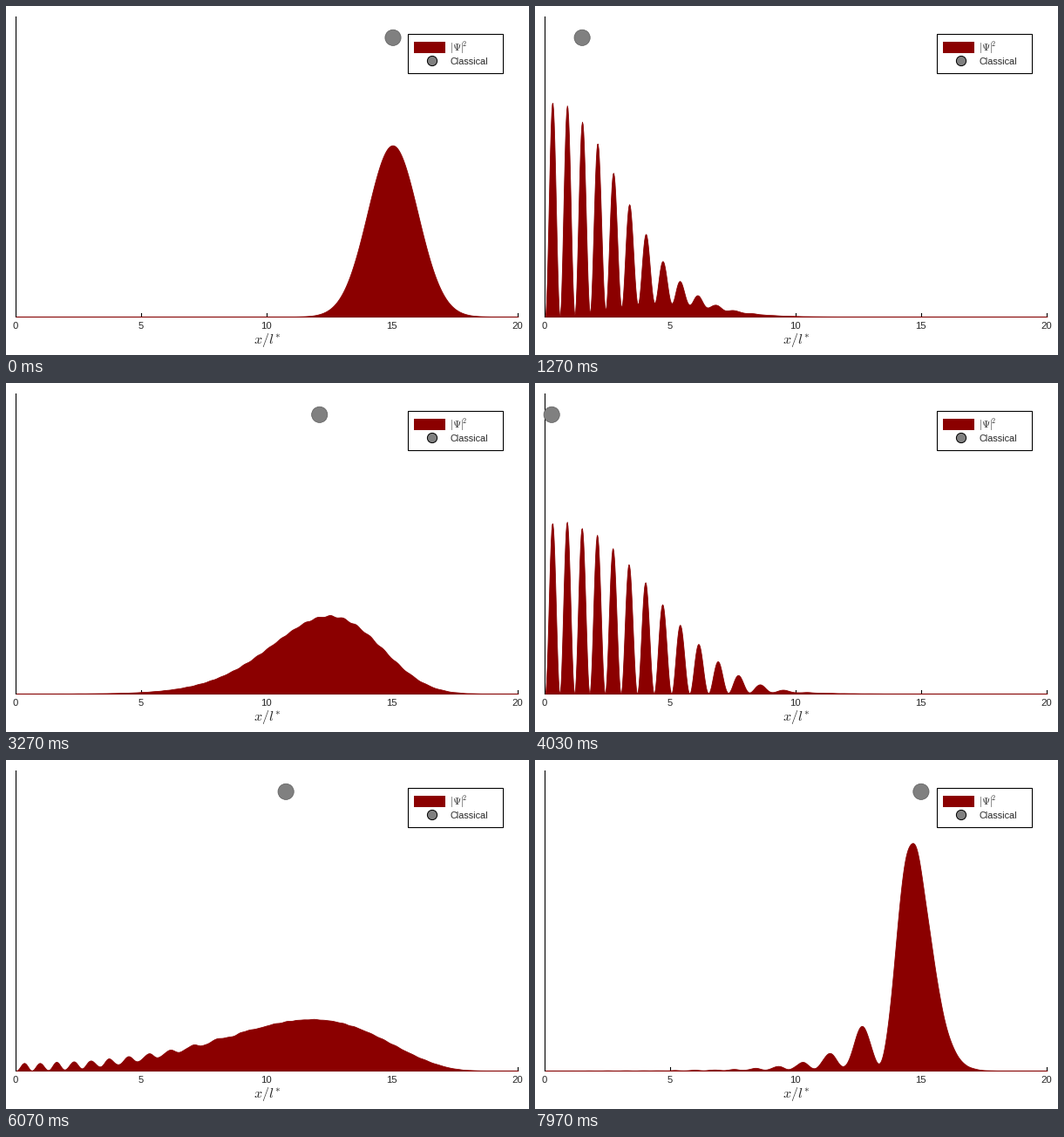
A matplotlib script that plays this animation: 600x400 px, repeating every 8 s.

```python
import numpy as np
import matplotlib.pyplot as plt
from matplotlib.animation import FuncAnimation
from matplotlib.patches import Circle, Polygon, Rectangle

W, H, DPI = 600, 400, 100
FRAMES, LOOP = 240, 8000
PX = 72 / DPI                      # one pixel in points
RED, GRAY, INK = "#8b0000", "#808080", "#262626"

# Plot area in pixels
X0, DX = 12.0, 28.8
Y0, DY = 356.5, 344.5 / 0.7

# Quantum bouncer with hbar = m = g = 1
START = 15.0
PERIOD = 2 * np.sqrt(2 * START)
STEP = PERIOD / 80
HOLD = PERIOD / 240                # short rest of the ball at the floor

N, BOX = 200, 30.0
n = np.arange(1, N + 1)
grid = BOX * n / (N + 1)
k = np.pi * n / BOX
sines = np.sqrt(2 / (N + 1)) * np.sin(np.pi * np.outer(n, n) / (N + 1))
xs = np.linspace(0, 20, 801)
to_xs = np.sqrt(2 / (N + 1)) * np.sin(np.outer(xs, k)) @ sines


def evolve():
    """Density at every frame, by split-step propagation in a sine basis."""
    half_kick = np.exp(-0.5j * STEP * grid)
    drift = np.exp(-0.5j * STEP * k**2)
    psi = np.exp(-(grid - START) ** 2 / 4) / (2 * np.pi) ** 0.25
    out = []
    for _ in range(FRAMES):
        out.append(np.abs(to_xs @ psi) ** 2)
        psi = half_kick * (sines @ (drift * (sines @ (half_kick * psi))))
    return out


def ball_height(frame):
    phase = (frame * STEP + PERIOD / 2) % (PERIOD + HOLD)
    swing = min(phase, PERIOD) - PERIOD / 2
    return START - swing**2 / 2


density = evolve()

plt.rcParams["mathtext.fontset"] = "cm"
fig = plt.figure(figsize=(W / DPI, H / DPI), dpi=DPI, facecolor="white")
ax = fig.add_axes([0, 0, 1, 1])
ax.set_xlim(0, W)
ax.set_ylim(H, 0)
ax.axis("off")


def line(x, y):
    ax.plot(x, y, color="black", lw=1.1 * PX, zorder=1, snap=False,
            solid_capstyle="butt")


def label(x, y, text, size, **kw):
    ax.text(x, y, text, fontsize=size * PX, color=INK, zorder=6,
            family="Liberation Sans", **kw)


# Axes
line([11.5, 11.5], [12, 357])
line([11, 588], [356.5, 356.5])
for value in range(0, 21, 5):
    x = X0 + DX * value
    if value:
        line([x - 0.5, x - 0.5], [352, 357])
    label(x - 1.4, 370.2, str(value), 11.2, ha="center", va="baseline")
label(299.7, 387, r"$x/l^{\!*}$", 16.2, ha="center", va="baseline")

# Legend
ax.add_patch(Rectangle((461.5, 32.5), 109, 45, fc="white", ec="black",
                       lw=1.1 * PX, zorder=4, snap=False))
ax.add_patch(Rectangle((468, 41), 36, 13, fc=RED, ec="none", zorder=5))
ax.add_patch(Circle((489, 63), 5.6, fc=GRAY, ec="black", lw=PX, zorder=5))
label(509, 51.3, r"$|\Psi|^{\!2}$", 11.8, va="baseline")
label(509.2, 66.8, "Classical", 10.7, va="baseline")

# Moving parts
px = X0 + DX * xs
hill = ax.add_patch(Polygon([[X0, Y0], [X0 + 1, Y0]], closed=True, fc=RED,
                            ec=RED, lw=0.8 * PX, joinstyle="round",
                            snap=False, zorder=2))
ball = ax.add_patch(Circle((0, 36.3), 9.1, fc=GRAY, ec="#5c5c5c",
                           lw=0.7 * PX, zorder=3))


def draw(frame):
    top = np.column_stack([px, Y0 - DY * density[frame]])
    hill.set_xy(np.vstack([[X0, Y0], top, [px[-1], Y0]]))
    ball.center = (X0 + DX * ball_height(frame), 36.3)
    return hill, ball


anim = FuncAnimation(fig, draw, frames=FRAMES, interval=LOOP / FRAMES,
                     repeat=True, repeat_delay=0, blit=False)
plt.show()
```
